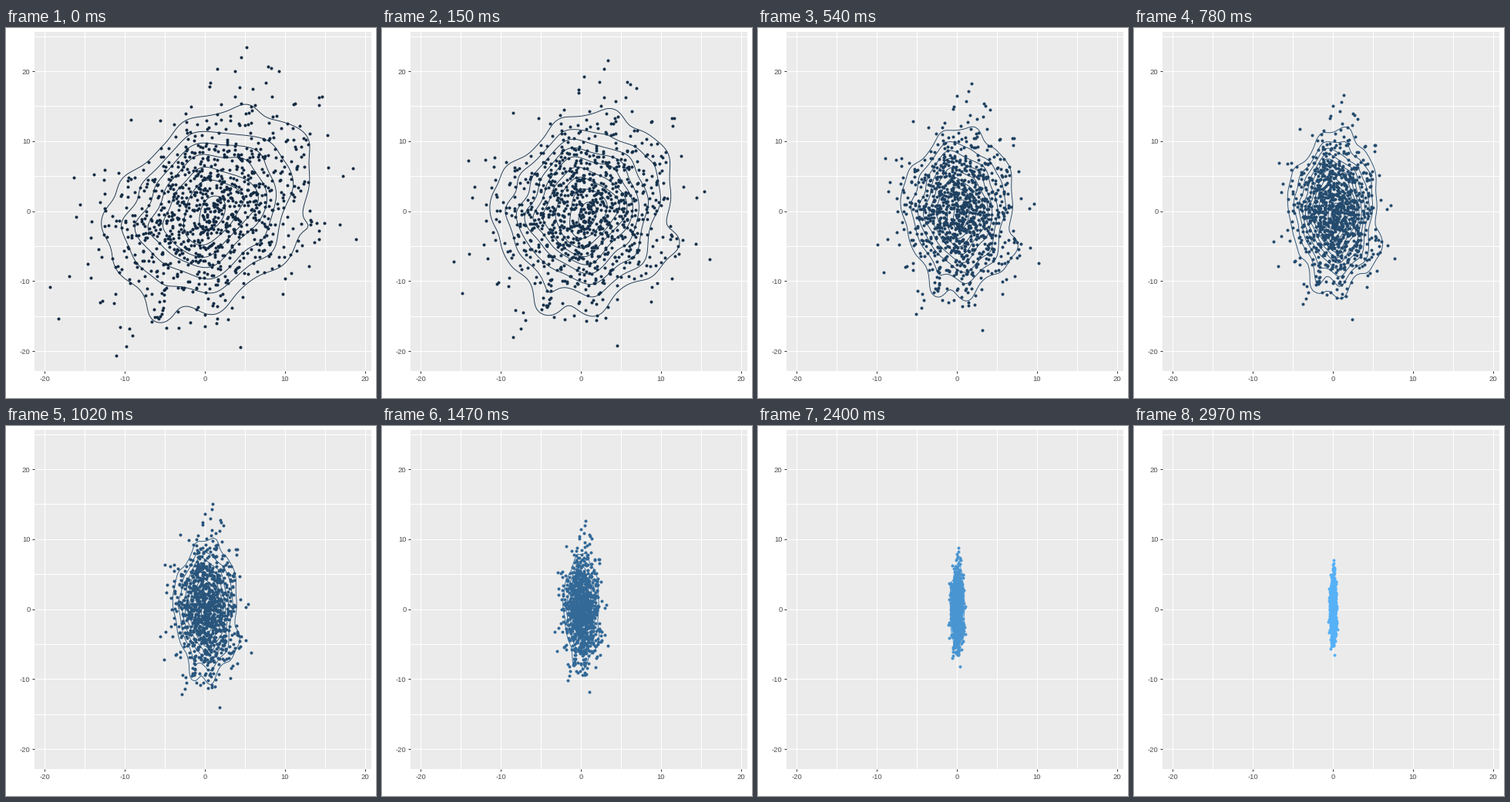
Write a matplotlib script that moves like this. It is 480 px wide and 480 px high and loops after 3 s.

```python
import numpy as np
import matplotlib.pyplot as plt
from matplotlib.animation import FuncAnimation

SIZE, DPI = 480, 100
PX = 72 / DPI                      # one pixel in points
FRAMES, INTERVAL = 100, 30
LEFT, RIGHT, TOP, BOTTOM = 37, 474, 5, 445
X0, Y0, SX, SY = 258, 237.55, 10.4, 9.075   # data origin and scale in pixels
COUNT, REACH, SPREAD = 1000, 3.0, (6.2, 6.8)

# Starting places of the outermost points, in data units
RIM = [(5.2, 23.4), (4.5, 22.0), (7.9, 20.7), (14.6, 16.4),
       (18.5, 6.1), (18.8, -4.0), (4.4, -19.4), (-11.1, -20.7),
       (-18.3, -15.4), (-19.3, -10.9), (-16.3, 4.8)]


def flow(t):
    """Linear map of the cloud at step t: fast decorrelation, slow decay."""
    mix = np.exp(-0.2 * t)
    shape = np.array([[1, 0.08 * mix], [0.27 * mix, 1]])
    return np.diag(np.exp([-0.036 * t, -0.0118 * t])) @ shape


def make_cloud():
    """Normal cloud with evenly ranked radii, cut at REACH, plus the rim."""
    rng = np.random.default_rng(12)
    n = COUNT - len(RIM)
    r = np.sqrt(-2 * np.log(np.linspace(np.exp(-REACH ** 2 / 2), 1, n)))
    a = rng.uniform(0, 2 * np.pi, n)
    body = np.column_stack([r * np.cos(a), r * np.sin(a)]) * SPREAD
    rim = np.array(RIM) @ np.linalg.inv(flow(0)).T
    return np.vstack([rim, body])


def color(t):
    u = t / (FRAMES - 1)
    low, high = np.array([19, 43, 67]), np.array([86, 177, 247])
    bend = 4 * u * (1 - u) * np.array([1, 4, 5])
    return tuple((low + (high - low) * u - bend) / 255)


def kernel(grid, v):
    q1, q3 = np.percentile(v, [25, 75])
    h = 1.06 * min(v.std(ddof=1), (q3 - q1) / 1.34) * len(v) ** -0.2
    z = (grid[:, None] - v) / h
    return np.exp(-z * z / 2) / (h * np.sqrt(2 * np.pi))


def nice_step(peak, most=17):
    base = 10.0 ** np.floor(np.log10(peak / most))
    return next(m * base for m in (1, 2, 5, 10) if peak / (m * base) <= most)


cloud = make_cloud()
start = cloud @ flow(0).T
gx, gy = (np.linspace(v.min(), v.max(), 100) for v in start.T)

fig = plt.figure(figsize=(SIZE / DPI, SIZE / DPI), dpi=DPI, facecolor="white")
ax = fig.add_axes([LEFT / SIZE, 1 - BOTTOM / SIZE,
                   (RIGHT - LEFT) / SIZE, (BOTTOM - TOP) / SIZE],
                  facecolor="#EBEBEB")
ax.set_xlim((LEFT - X0) / SX, (RIGHT - X0) / SX)
ax.set_ylim((Y0 - BOTTOM) / SY, (Y0 - TOP) / SY)
ax.autoscale(False)
for side in ax.spines.values():
    side.set_visible(False)

major = range(-20, 21, 10)
for axis in (ax.xaxis, ax.yaxis):
    axis.set_ticks(major, [str(v) for v in major])
    axis.set_ticks([-15, -5, 5, 15] + ([25] if axis is ax.yaxis else []),
                   minor=True)
ax.set_axisbelow(True)
ax.grid(which="both", color="white", lw=1 * PX, antialiased=False)
ax.tick_params(which="major", length=3 * PX, width=1 * PX, color="#333333",
               labelcolor="#4D4D4D", labelsize=9.5 * PX,
               labelfontfamily="Liberation Sans", pad=2.5 * PX)
ax.tick_params(which="minor", length=0)

dots, = ax.plot([], [], "o", ms=4 * PX, mew=0, zorder=3)
lines = None


def draw(t):
    global lines
    x, y = flow(t) @ cloud.T
    dots.set_data(x, y)
    dots.set_color(color(t))
    if lines is not None:
        lines.remove()
    z = kernel(gy, y) @ kernel(gx, x).T / len(x)
    step = nice_step(z.max())
    lines = ax.contour(gx, gy, z, levels=np.arange(step, z.max(), step),
                       colors=[color(t)], linewidths=0.9 * PX,
                       antialiased=True, zorder=4)
    return dots, lines


anim = FuncAnimation(fig, draw, frames=FRAMES, interval=INTERVAL,
                     init_func=lambda: draw(0), repeat=True, repeat_delay=0,
                     blit=False)
plt.show()
```
